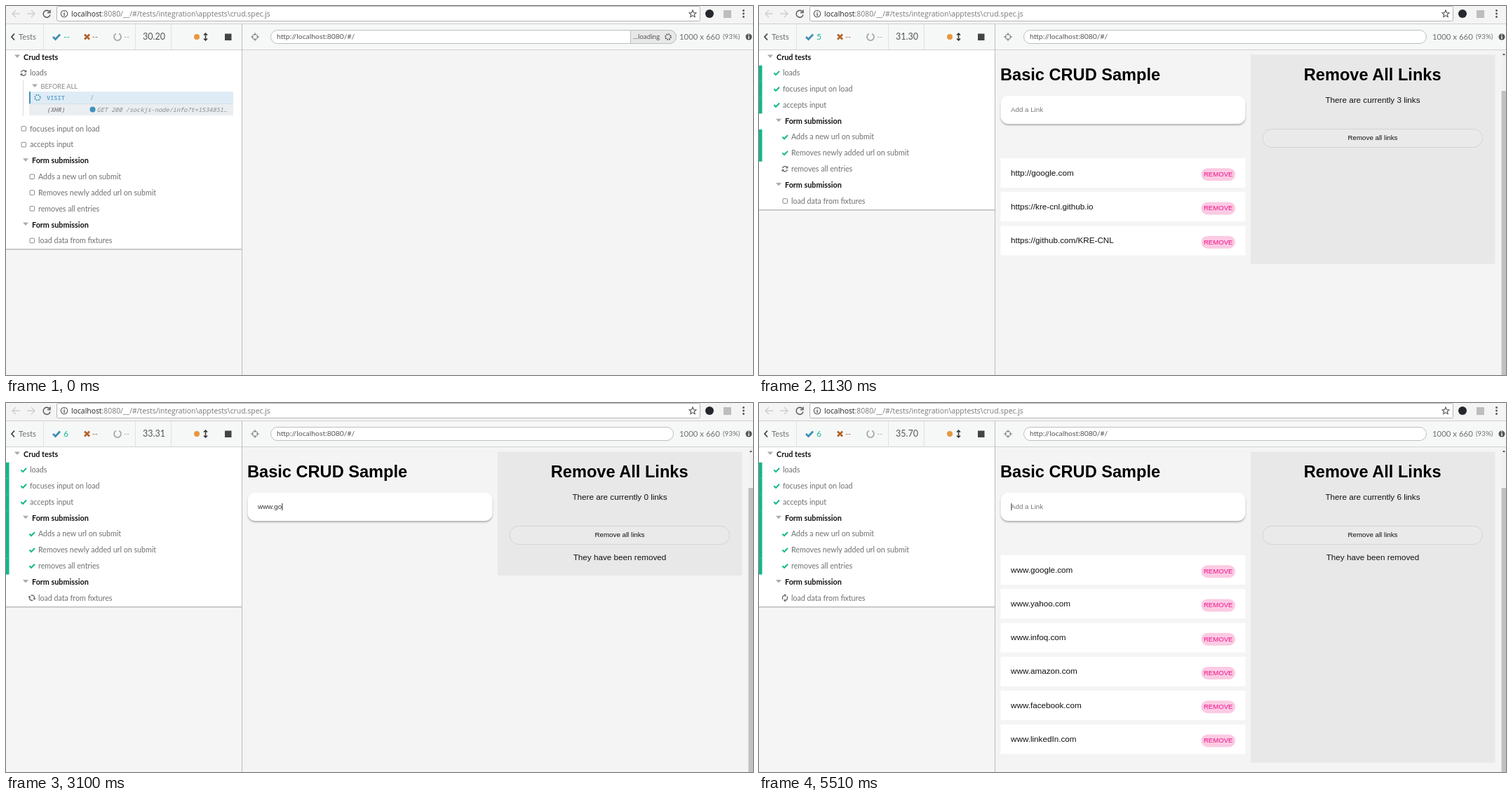
An HTML page that plays this animation: 1065 px wide and 526 px high, repeating every 5550 ms.

```html
<!DOCTYPE html>
<html lang="en">
<head>
<meta charset="utf-8">
<title>Test runner</title>
<style>
  html, body { margin: 0; width: 100%; height: 100%; overflow: hidden; background: #f4f4f4; }
  svg { display: block; width: 1065px; height: 526px; }
  text { font: 11px Lato, sans-serif; fill: #707070; white-space: pre; }
  .address { font: 10.4px "Open Sans", sans-serif; fill: #777; }
  .mono { font: 8.6px "Noto Sans Mono", monospace; }
  .page { font: 11.7px "Liberation Sans", Arial, sans-serif; fill: #111; }
  .small { font-size: 9.75px; }
  .h1 { font-size: 23.6px; font-weight: bold; fill: #000; }
  .bold { font-weight: bold; }
  .mid { text-anchor: middle; }
  .line { fill: none; stroke: currentColor; }
</style>
</head>
<body>
<svg viewBox="0 0 1065 526">
  <rect width="1065" height="25" fill="#f4f4f4"/>
  <rect x="72.5" y=".5" width="917" height="21" rx="2" fill="#fff" stroke="#b5b5b5"/>
  <g class="line" stroke-width="1.4">
    <path color="#cfcfcf" d="M20 11H9M14 6L9 11L14 16M30 11H41M36 6L41 11L36 16"/>
    <path color="#555" d="M62 8A5 5 0 1 0 63 12.500M63 5.500V9.500H59"/>
    <circle color="#555" cx="83" cy="11" r="4.700" stroke-width="1.100"/>
    <path color="#555" d="M83 10V14M83 8V9"/>
    <path color="#555" stroke-width="1.100" d="M979 6L980.500 9.500L984 9.700L981.300 12L982.200 15.600L979 13.600L975.800 15.600L976.700 12L974 9.700L977.500 9.500Z"/>
  </g>
  <text class="address" x="93" y="14.700"><tspan fill="#222">localhost</tspan>:8080/__/#/tests/integration\apptests\crud.spec.js</text>
  <circle cx="1003" cy="11" r="6" fill="#25272e"/>
  <rect x="1023" y="6" width="11" height="11" fill="#bdbdbd"/>
  <g fill="#555"><circle cx="1051.500" cy="6.500" r="1.400"/><circle cx="1051.500" cy="11" r="1.400"/><circle cx="1051.500" cy="15.500" r="1.400"/></g>

  <rect y="25" width="1065" height="38" fill="#f6f8f8"/>
  <path class="line" color="#d0d0d0" d="M0 25.500H1065M0 62.500H1065"/>
  <path class="line" color="#e0e2e2" d="M53.500 26V62M184.500 26V62M235.500 26V62"/>
  <path class="line" color="#444" stroke-width="1.800" d="M12 39.500L8 44L12 48.500"/>
  <text x="18" y="48" fill="#555" style="font-size:11.2px">Tests</text>
  <path class="line" color="#3e8fb5" stroke-width="2.800" d="M67 44L70.500 47.500L77 40.500"/>
  <path class="line" color="#b5652b" stroke-width="2.800" d="M112 40.500L119 47.500M119 40.500L112 47.500"/>
  <text x="123" y="48" style="fill:#b5652b">--</text>
  <path class="line" color="#aaa" stroke-width="1.900" d="M157 39.500A5 5 0 1 0 161 39.500"/>
  <text x="168" y="48" style="fill:#aaa">--</text>
  <circle cx="272" cy="44" r="4" fill="#e8963e"/>
  <path class="line" color="#333" stroke-width="1.500" d="M284.500 39V49M282 41.500L284.500 39L287 41.500M282 46.500L284.500 49L287 46.500"/>
  <rect x="312" y="39.500" width="9.500" height="9.500" fill="#444"/>
  <g class="line" color="#777"><circle cx="355" cy="44" r="3.800"/><path d="M355 38V42M355 46V50M349 44H353M357 44H361"/></g>
  <text x="960" y="47.500" style="font-size:11.4px">1000 x 660</text>
  <text x="1022" y="47" style="font-size:9.8px">(93%)</text>
  <circle cx="1059" cy="44" r="4.500" fill="#555"/>
  <path d="M1059 43V47M1059 40.500V42" stroke="#fff" stroke-width="1.400"/>
  <g id="live"></g>
</svg>
<script>
const LOOP = 5550, KEY = 27.3, ROW = 22.8;
const PAGE_AT = 40, LOG_OPEN = 1990, CLEARED = 2700;
const GREEN = "#10b78c", BLUE = "#4092bd";
const live = document.getElementById("live");

// title, depth, start, end
const tests = [
  ["loads", 0, 0, 90],
  ["focuses input on load", 0, 90, 150],
  ["accepts input", 0, 150, 560],
  ["Adds a new url on submit", 1, 560, 860],
  ["Removes newly added url on submit", 1, 860, 1120],
  ["removes all entries", 1, 1120, 2800],
  ["load data from fixtures", 1, 2800, Infinity],
];
const savedLinks = ["http://google.com", "https://kre-cnl.github.io", "https://github.com/KRE-CNL"];
const fixture = ["google", "yahoo", "infoq", "amazon", "facebook", "linkedIn"].map(n => `www.${n}.com`);

const text = (x, y, s, cls = "", style = "") => `<text x="${x}" y="${y}" class="${cls}" style="${style}">${s}</text>`;
const mono = (x, y, s, color, bold = "") => text(x, y, s, "mono " + bold, `fill:${color}`);
const rect = (x, y, w, h, fill, extra = "") => `<rect x="${x}" y="${y}" width="${w}" height="${h}" fill="${fill}" ${extra}/>`;
const stroke = (d, color, width = 1) => `<path class="line" d="${d}" color="${color}" stroke-width="${width}"/>`;
const caret = (x, y) => `<path d="M${x - 4} ${y - 2}h8l-4 4.500z" fill="#aaa"/>`;

function refresh(x, y, angle) {
  const half = turn => `<g transform="rotate(${turn})">${stroke("M-3.600 -.8A3.700 3.700 0 0 1 2.800 -2.400", "#666", 1.4)}<path d="M4.300 -4.300V-.8H.8Z" fill="#666"/></g>`;
  return `<g transform="translate(${x} ${y}) rotate(${angle})">${half(0)}${half(180)}</g>`;
}

function spinner(x, y, t, color = BLUE) {
  return `<circle class="line" cx="${x}" cy="${y}" r="3.800" color="${color}" stroke-width="1.900" stroke-dasharray="1.600 1.380" transform="rotate(${t * .18} ${x} ${y})"/>`;
}

function visitLog(t) {
  const slanted = "fill:#888;font-style:italic";
  return stroke("M24.500 106V157", "#ddd") + caret(41, 113.5) +
    text(49.5, 117.5, "BEFORE ALL", "", "font-size:9.2px;fill:#888") +
    rect(33, 122, 291, 17, "#dfecf6") + rect(33, 122, 2, 17, BLUE) +
    rect(33, 139, 291, 17, "#ebeef1") + stroke("M33 139.500H324", "#d5e0e8") +
    spinner(45, 130.5, t) + mono(58, 133.5, "VISIT", "#69a7cd", "bold") + mono(120, 133.5, "/", "#69a7cd") +
    `<circle cx="123.500" cy="147.500" r="4" fill="${BLUE}"/>` +
    text(58, 150.5, "(XHR)", "mono bold", slanted) +
    text(129.5, 150.5, "GET 200 /sockjs-node/info?t=1534851…", "mono", slanted);
}

function removeLog(t) {
  const pale = "#69a7cd", deep = "#3179ae";
  return stroke("M36.500 243V342", "#ddd") + caret(52.5, 250) +
    text(61, 254.5, "TEST", "", "font-size:9.2px;fill:#888") +
    rect(45, 259, 279, 33, "#ebeef1") + rect(45, 292, 279, 47, "#dfecf6") +
    rect(45, 292, 2, 47, BLUE) + stroke("M45 292.500H324", "#cfdde7") +
    mono(55, 270.5, "1", "#aaa") + mono(70, 270.5, "GET", "#555", "bold") + mono(131, 270.5, "[data-cy=removeall-btn]", "#777") +
    mono(55, 287, "2", "#aaa") + mono(74, 287, "-CLICK", "#555", "bold") +
    spinner(57.5, 300.5, t) + mono(70, 304, "GET", pale, "bold") + mono(131, 304, ".url-list li", pale) +
    spinner(57.5, 317, t) + mono(74, 320, "-", pale) +
    rect(80, 312, 33, 10.5, "#3f8fc8", 'rx="1.500"') + mono(81.5, 320, "ASSERT", "#fff", "bold") +
    mono(131, 320.5, "expected", pale) + mono(180, 320.5, "[ &lt;li>, 2 more... ]", deep, "bold") + mono(286, 320.5, "to", pale) +
    mono(131, 334.5, "have a length of", pale) + mono(221.5, 334.5, "0", deep, "bold") +
    mono(234.5, 334.5, "but got", pale) + mono(278, 334.5, "3", deep, "bold");
}

function reporter(t) {
  let y = 72.6, out = "";
  const bar = () => out += rect(0, y - 10.6, 4.5, ROW + .1, GREEN);
  const header = (title, x) => {
    out += caret(x, y - 1) + text(x + 9, y + 4, title, "bold", "font-size:10.8px;fill:#111");
    y += ROW;
  };
  header("Crud tests", 16);
  tests.forEach(([title, depth, start, end], i) => {
    if (i == 3 && t >= tests[5][3]) bar();
    if (i == 3 || i == 6) header("Form submission", 28);
    const x = 25 + depth * 12;
    if (t >= end) {
      bar();
      out += stroke(`M${x - 3.7} ${y}l2.700 2.700l5 -5.200`, GREEN, 2);
    } else if (t >= start) out += refresh(x, y, (t - start) * .18);
    else out += rect(x - 3, y - 3.1, 6.5, 6.5, "#fff", 'rx="1" stroke="#888"');
    out += text(x + 9, y + 3.8, title, "", "font-size:10.65px");
    y += ROW;
    if (i == 0 && t < end) { out += visitLog(t); y += 56.5; }
    if (i == 5 && t >= LOG_OPEN && t < end) { out += removeLog(t); y += 102.8; }
  });
  const bottom = Math.round(y - 11);
  return rect(0, 63, 336, 463, "#f5f5f5") + rect(0, 63, 336, bottom - 63, "#fff") +
    rect(0, bottom, 336, 1.5, "#bcbcbc") + out + stroke("M336.500 26V526", "#bdbdbd");
}

// Text in the input box and the list of links at time t
function form(t) {
  const links = t < CLEARED ? [...savedLinks] : [];
  let typed = "";
  const type = (word, start) => {
    const n = Math.floor((t - start) / KEY) + 1;
    if (n > 0 && n <= word.length) typed = word.slice(0, n);
    return n > word.length;
  };
  if (t < 560) { if (type(fixture[0], 190)) typed = fixture[0]; }
  else if (t < 1000) { if (type(fixture[0], 570 - 6 * KEY)) links.push(fixture[0]); }
  let start = 2960;
  fixture.forEach((word, i) => {
    if (type(word, start)) links.push(word);
    start = i ? start + (word.length + 1) * KEY : 3426;
  });
  return { links, typed, focused: t < 1000 || t >= 2900 };
}

function page(t) {
  const { links, typed, focused } = form(t);
  const cursor = focused ? '<tspan dx="-.6" fill="#111" font-size="11">|</tspan>' : "";
  const value = typed ? typed + cursor : cursor + (focused ? '<tspan dx="-2.200">Add a Link</tspan>' : "Add a Link");
  let out = text(344, 106, "Basic CRUD Sample", "page h1") +
    rect(344.5, 128, 349, 40, "#fff", 'rx="11" style="filter:drop-shadow(0 2.5px 1.2px #0004)"') +
    text(359, 151, value, "page small", `fill:${typed ? "#333" : "#777"}`) +
    rect(701, 69.5, 348.5, Math.max(246, 222.3 + 48.4 * links.length) - 69.5, "#e8e8e8") +
    text(874.7, 106, "Remove All Links", "page h1 mid") +
    text(875, 138, `There are currently ${links.length} links`, "page mid") +
    rect(718, 175.5, 313.5, 26, "#eaeaea", 'rx="13" stroke="#d4d4d4"') +
    text(875, 191.2, "Remove all links", "page small mid");
  if (t >= CLEARED) out += text(875, 223.5, "They have been removed", "page mid");
  links.forEach((link, i) => {
    const y = 217 + 48.25 * i;
    out += rect(344.5, y, 349, 42, "#fff") + text(359, y + 24.6, link, "page") +
      rect(630.5, y + 14.2, 48.5, 18, "#fbcae3", 'rx="9"') +
      text(654.7, y + 26.2, "REMOVE", "page mid", "font-size:9.6px;fill:#f0128a");
  });
  return out + rect(1058.5, 63, 6.5, 463, "#f1f1f1") + rect(1058.5, 121, 6.5, 405, "#c1c1c1") +
    '<path d="M1060 70h4l-2 -2.500z" fill="#444"/>';
}

function toolbar(t) {
  const passed = tests.filter(test => t >= test[3]).length;
  const clock = 30.2 + Math.floor((t + 30) / 100) / 10 + (t > 100 && t < 1000 || t > 3000 && t < 5000 ? .01 : 0);
  const loading = t < PAGE_AT;
  let out = text(82, 48.2, passed || "--", "", `font-size:12px;fill:${GREEN}`) +
    text(195, 48.3, clock.toFixed(2), "", "font-size:12.5px;fill:#555") +
    rect(377.5, 34.5, loading ? 578 : 574, 19, "#fff", 'rx="9.500" stroke="#bfbfbf"') +
    text(386, 47.3, "http://localhost:8080/#/", "", "font-size:10.4px;fill:#555");
  if (loading) out += '<path d="M890.500 34.500H946A9.500 9.500 0 0 1 946 53.500H890.500Z" fill="#e8e8e8" stroke="#bfbfbf"/>' +
    text(894, 47.3, "...loading", "", "font-size:9.8px;fill:#555") + spinner(944, 44, t, "#444");
  return out;
}

function draw() {
  const t = performance.now() % LOOP;
  live.innerHTML = toolbar(t) + (t < PAGE_AT ? "" : page(t)) + reporter(t);
  requestAnimationFrame(draw);
}
draw();
</script>
</body>
</html>
```
